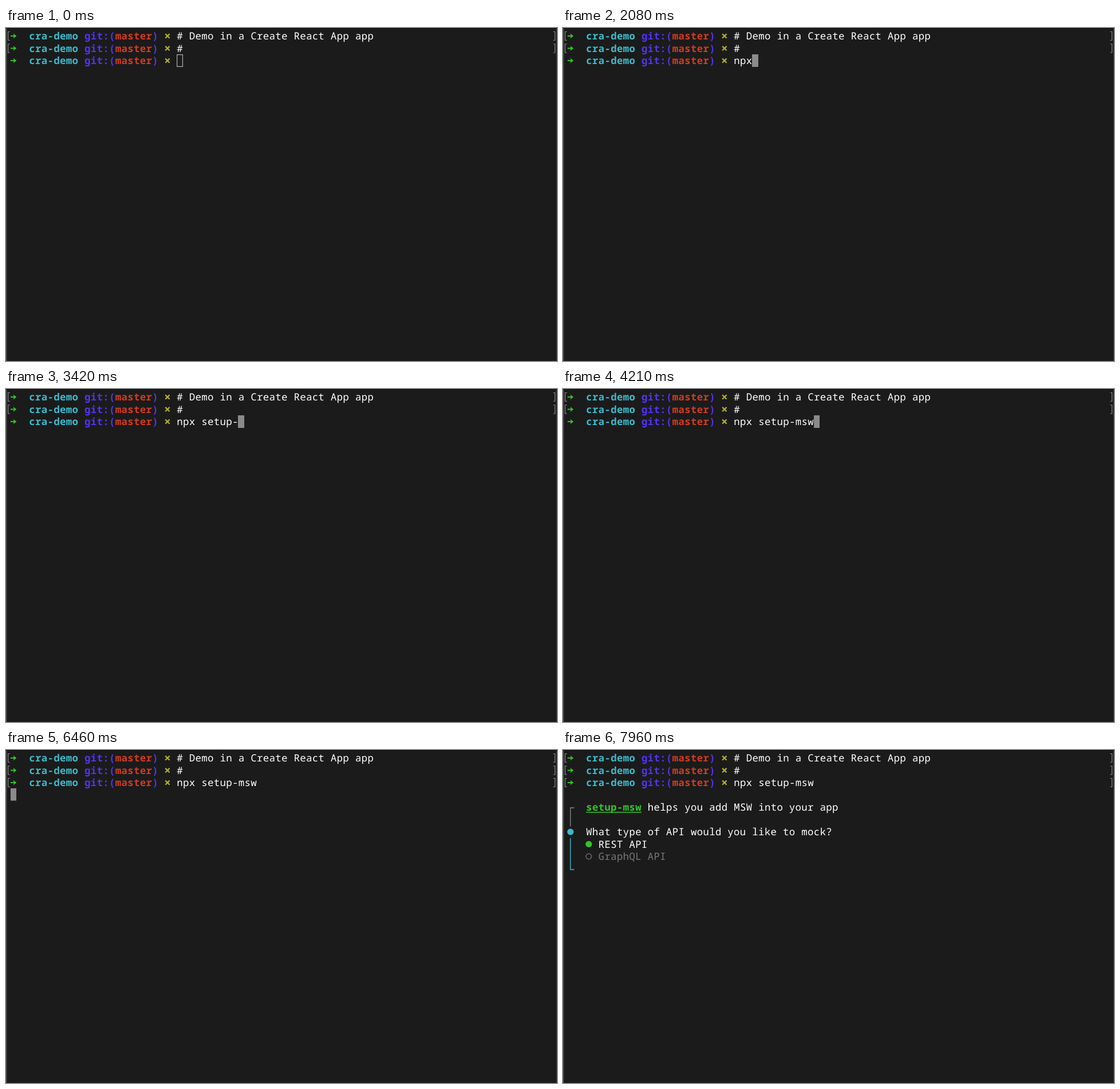
An HTML page for the animation above (8000 ms loop, 962 by 582 pixels).

```html
<!DOCTYPE html>
<html lang="en">
<head>
<meta charset="utf-8">
<title>Terminal demo</title>
<style>
  html, body { margin: 0; width: 100%; height: 100%; overflow: hidden; background: #1b1b1b; }
  svg { display: block; width: 100vw; height: 100vh; }
  text {
    font: 500 17.4px "Noto Sans Mono", "DejaVu Sans Mono", monospace;
    letter-spacing: 0.31px;
    white-space: pre;
    text-rendering: geometricPrecision;
  }
  .bold { font-weight: 700; }
</style>
</head>
<body>
<svg id="stage" viewBox="0 0 962 582" xmlns="http://www.w3.org/2000/svg"></svg>
<script>
const LOOP = 8000, CELL = 10.75, LINE = 21.5, LEFT = 8, TOP = 3;
const C = {
  white: '#ffffff', cyan: '#3bbacb', blue: '#5433f2', red: '#d03b22',
  green: '#33c328', yellow: '#b3b022', gray: '#8a8a8a', dim: '#777777'
};
const COMMAND = 'npx setup-msw';
const PROMPT_COL = 27;
// When each character of the command appears, in ms
const KEYS = [1750, 1880, 2000, 2170, 2580, 2690, 2790, 2960, 3080, 3250, 3580, 3710, 3920];
const FOCUS = 420, ENTER = 4380, OUTPUT = 7420;

const stage = document.getElementById('stage');
const colX = col => LEFT + col * CELL;
const midY = row => TOP + row * LINE + 11;

function add(parent, tag, attrs, content) {
  const el = document.createElementNS('http://www.w3.org/2000/svg', tag);
  for (const k in attrs) el.setAttribute(k, attrs[k]);
  if (content) el.textContent = content;
  parent.appendChild(el);
  return el;
}

const write = (parent, row, col, str, fill, bold) =>
  add(parent, 'text', { x: colX(col), y: midY(row) + 6.1, fill, class: bold ? 'bold' : '' }, str);

const stroke = (parent, d, color, width) =>
  add(parent, 'path', { d, fill: 'none', stroke: color, 'stroke-width': width });

const box = (parent, x, y, width, height, fill) =>
  add(parent, 'rect', { x, y, width, height, fill });

const show = (el, on) => el.setAttribute('visibility', on ? 'visible' : 'hidden');

function prompt(row) {
  const y = midY(row);
  stroke(stage, `M8 ${y}H16`, C.green, 2);
  add(stage, 'path', { d: `M12.6 ${y - 4.5}L18.4 ${y}L12.6 ${y + 4.5}L14 ${y}Z`, fill: C.green });
  write(stage, row, 3, 'cra-demo', C.cyan, true);
  write(stage, row, 12, 'git:(', C.blue, true);
  write(stage, row, 17, 'master', C.red, true);
  write(stage, row, 23, ')', C.blue, true);
  stroke(stage, `M278.2 ${y - 3.6}l7.4 7.4m0 -7.4l-7.4 7.4`, C.yellow, 2.3);
}

function brackets(row) {
  const y = midY(row), g = add(stage, 'g', {});
  stroke(g, `M7 ${y - 7.5}H3.7V${y + 7.5}H7M955.5 ${y - 7.5}H958.5V${y + 7.5}H955.5`, C.gray, 1.2);
  return g;
}

// Window
box(stage, 0, 0, 962, 582, '#1b1b1b');
box(stage, 0, 0, 1.6, 582, '#474747');
box(stage, 961, 0, 1, 582, '#3c3c3c');
box(stage, 0, 0, 962, 1, '#0c0c0c');

// Prompt lines
[0, 1, 2].forEach(prompt);
write(stage, 0, PROMPT_COL, '# Demo in a Create React App app', C.white);
write(stage, 1, PROMPT_COL, '#', C.white);
brackets(0);
brackets(1);
const lastBrackets = brackets(2);
const typed = write(stage, 2, PROMPT_COL, '', C.white);
const cursor = box(stage, 0, 0, 0, 0, C.gray);

// Menu printed by the command
const menu = add(stage, 'g', {});
stroke(menu, 'M19.5 101H13V133.5', C.gray, 1.3);
write(menu, 4, 3, 'setup-msw', C.green, true);
box(menu, 40, 108, 97, 1.5, C.green);
write(menu, 4, 13, 'helps you add MSW into your app', C.white);
add(menu, 'circle', { cx: 13, cy: 143, r: 5.6, fill: C.cyan });
write(menu, 6, 3, 'What type of API would you like to mock?', C.white);
stroke(menu, 'M13 154V209H19.5', C.cyan, 1.4);
add(menu, 'circle', { cx: 45, cy: 164.5, r: 5.6, fill: C.green });
write(menu, 7, 5, 'REST API', C.white);
add(menu, 'circle', { cx: 45, cy: 186, r: 4.8, fill: 'none', stroke: C.dim, 'stroke-width': 1.3 });
write(menu, 8, 5, 'GraphQL API', C.dim);

function placeCursor(row, col, filled) {
  const inset = filled ? 0 : 0.6;
  const x = Math.floor(colX(col)), y = Math.floor(TOP + row * LINE);
  const w = Math.floor(colX(col + 1)) - x, h = row === 2 ? 22 : 21.5;
  const attrs = {
    x: x + inset, y: y + inset, width: w - 2 * inset, height: h - 2 * inset,
    fill: filled ? C.gray : 'none', stroke: filled ? 'none' : '#b0b0b0', 'stroke-width': 1.2
  };
  for (const k in attrs) cursor.setAttribute(k, attrs[k]);
}

function render(t) {
  const count = KEYS.filter(k => t >= k).length;
  const entered = t >= ENTER, done = t >= OUTPUT;
  typed.textContent = COMMAND.slice(0, count);
  placeCursor(entered ? 3 : 2, entered ? 0 : PROMPT_COL + count, t >= FOCUS);
  show(lastBrackets, entered);
  show(cursor, !done);
  show(menu, done);
}

const start = performance.now();
function tick() {
  render((performance.now() - start) % LOOP);
  requestAnimationFrame(tick);
}
tick();
</script>
</body>
</html>
```
